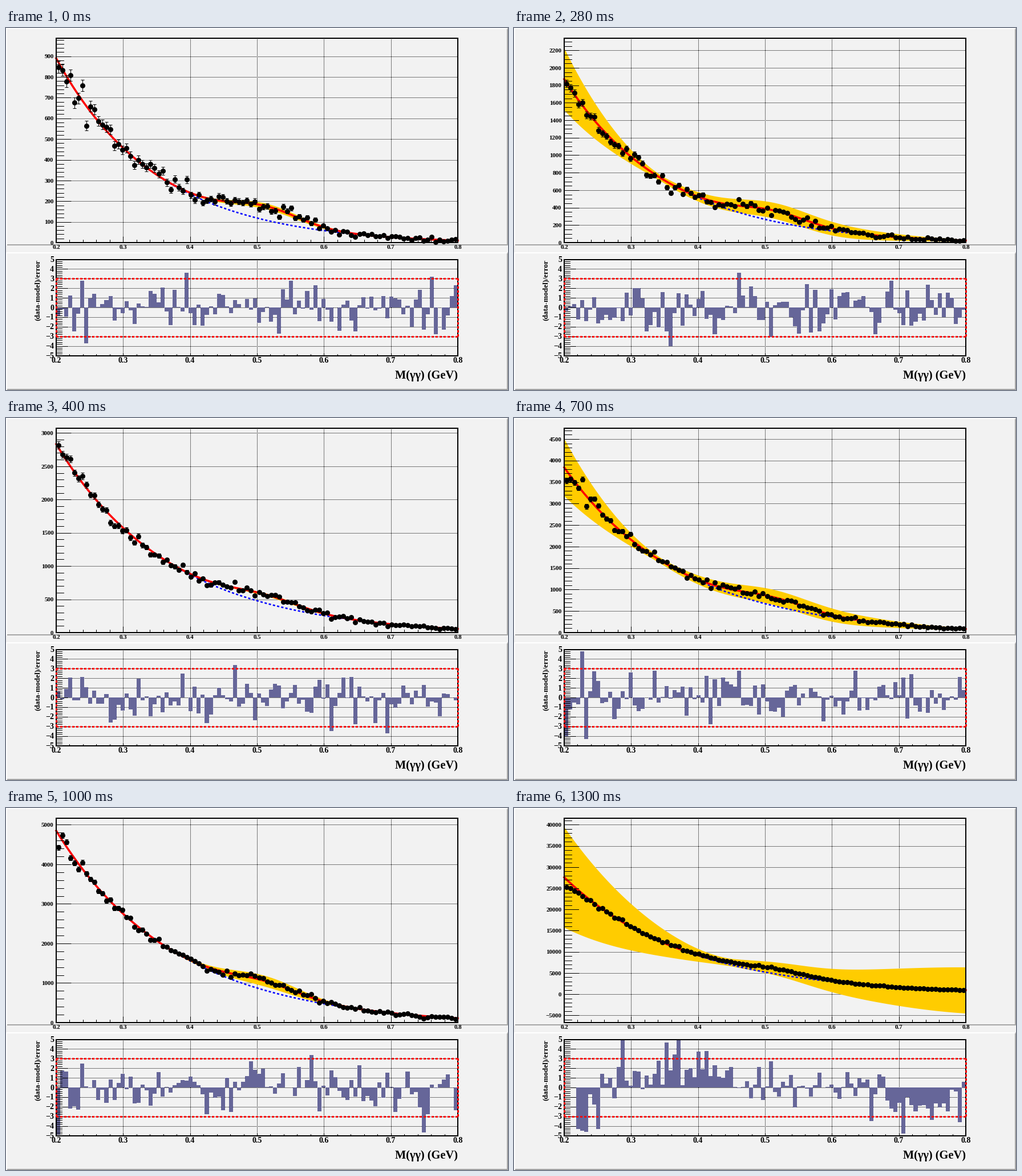
A matplotlib script for the animation above (1600 ms loop, 880 by 636 pixels).

```python
import matplotlib.pyplot as plt
import numpy as np
from matplotlib.animation import FuncAnimation

W, H, PT = 880, 636, 0.72          # stage in px, points per px
LEFT, RIGHT = 88, 792
TOP, BOTTOM = 18, 377              # spectrum box
ZERO, UNIT = 491, 16.9             # pull box: centre line, px per sigma
BINS = 100

# lo, hi, step: count axis; peak, slope, bend: background; signal: bump height
# band: edge width, pinch point, hump width, hump centre, hump spread
# spikes: the bins that stand out of the noise
FITS = [
    dict(lo=0, hi=987, step=100, peak=890, slope=4.0, bend=.5, signal=68,
         band=(2, .25, 4, .53, .1), spikes={7: -3.7, 32: 3.6, 93: 3.2}),
    dict(lo=0, hi=2338, step=200, peak=1870, slope=3.87, bend=.5, signal=124,
         band=(53, .25, 13, .55, .2), spikes={26: -4, 43: 3.6, 51: -3.1}),
    dict(lo=0, hi=3072, step=500, peak=2833, slope=3.53, bend=.4, signal=130,
         band=(1, .25, 1.5, .55, .1), spikes={44: 3.4, 68: -3.5, 82: -3.7}),
    dict(lo=0, hi=4751, step=500, peak=3840, slope=3.46, bend=.37, signal=200,
         band=(49, .25, 12.5, .55, .2), spikes={0: -4, 4: 4.8, 5: -4.3}),
    dict(lo=0, hi=5165, step=1000, peak=4849, slope=3.4, bend=.4, signal=235,
         band=(1, .25, 8.5, .52, .1), spikes={0: -4.9, 63: 3.4, 91: -4.7}),
    dict(lo=-6710, hi=41540, step=5000, peak=27600, slope=3.33, bend=.04, signal=1250,
         band=(87, .42, 40, 1.05, .32), spikes={8: -4.3, 14: 5, 84: -4.8}, drift=True),
]

plt.rcParams["font.family"] = "Liberation Serif"
plt.rcParams["font.weight"] = "bold"
fig = plt.figure(figsize=(W / 100, H / 100), dpi=100, facecolor="#f2f2f2")
ax = fig.add_axes([0, 0, 1, 1])
ax.axis("off")
ax.set_xlim(0, W)
ax.set_ylim(H, 0)


def to_x(t):
    return LEFT + t * (RIGHT - LEFT)


def bell(t, centre, spread):
    return np.exp(-0.5 * ((t - centre) / spread) ** 2)


def line(x, y, color="k", w=1, dash=None, **kw):
    if dash:
        kw["linestyle"] = (0, [d / (w * PT) for d in np.multiply(dash, PT)])
    kw.setdefault("antialiased", False)
    return ax.plot(x, y, color=color, lw=w * PT, **kw)[0]


def label(x, y, s, size, **kw):
    kw.setdefault("ha", "right")
    return ax.text(x, y, s, fontsize=size * PT, va="baseline", **kw)


def grid(x, y):
    return line(x, y, dash=(1, 2), zorder=1)


def box(top, bottom):
    line([LEFT, RIGHT, RIGHT, LEFT, LEFT], [top, top, bottom, bottom, top],
         w=2, zorder=6, solid_joinstyle="miter")


def pad(top, bottom):
    line([0, W], [bottom, bottom], "#a6a6a6", 2)
    line([W - 1, W - 1], [top, bottom], "#a6a6a6", 2)
    line([0, W - 2], [top, top], "white", 2)
    line([1, 1], [top, bottom], "white", 2)


def signed(v):
    return f"{v:d}".replace("-", "\u2212")


def x_axis(top, bottom, base, size, long, short):
    for k in range(31):
        x = to_x(k / 30)
        major = k % 5 == 0
        line([x, x], [bottom, bottom - (long if major else short)], zorder=6)
        if major:
            label(x, base, f"{0.2 + 0.02 * k:.1f}", size, ha="center", zorder=7)
            if 0 < k < 30:
                grid([x, x], [top, bottom])


def draw_static():
    pad(1, 381)
    pad(395, 635)
    low, high = ZERO + 5 * UNIT, ZERO - 5 * UNIT
    box(TOP, BOTTOM)
    box(high, low)
    x_axis(TOP, BOTTOM, 388, 11, 10, 5)
    x_axis(high, low, 587.5, 14, 5, 3)
    for k in range(-25, 26):
        y = ZERO - k * UNIT / 5
        major = k % 5 == 0
        line([LEFT, LEFT + (20 if major else 10)], [y, y], zorder=6)
        if major:
            label(84, y + 4.5, signed(k // 5), 14)
            grid([LEFT, RIGHT], [y, y])
    reach = 3 * UNIT
    for y in (ZERO - reach, ZERO + reach):
        line([LEFT, RIGHT], [y, y], "red", 3, (3, 3), zorder=8)
    for x in (LEFT, RIGHT):
        line([x, x], [ZERO - reach, ZERO + reach], "red", 3, (3, 3), zorder=8)
    label(58.5, 407, "(data-model)/error", 13.3, rotation=90, rotation_mode="anchor")
    label(791.5, 616, "M(γγ) (GeV)", 20.4)


def background(fit, t):
    return fit["peak"] * np.exp(-fit["slope"] * t - fit["bend"] * t ** 5)


def model(fit, t):
    return background(fit, t) + fit["signal"] * bell(t, 0.52, 0.087)


def half_band(fit, t):
    edge, pinch, hump, centre, spread = fit["band"]
    return 1 + edge * np.maximum(1 - t / pinch, 0) ** 1.6 + hump * bell(t, centre, spread)


def make_pulls(fit, seed, t):
    pulls = np.clip(np.random.RandomState(seed).normal(0, 1.35, BINS), -2.8, 2.8)
    if fit.get("drift"):
        pulls += 2.5 * bell(t, 0.28, 0.12) - 1.6 * bell(t, 0.87, 0.1) - 14 * np.exp(-t / 0.03)
    for i, p in fit["spikes"].items():
        pulls[i] = p
    return pulls


live = []


def draw_counts(fit, to_y):
    step = fit["step"]
    div = 4 if str(step).startswith("2") else 5
    minor = step // div
    for k in range(int(np.ceil(fit["lo"] / minor)), fit["hi"] // minor + 1):
        y = to_y(k * minor)
        major = k % div == 0
        live.append(line([LEFT, LEFT + (25 if major else 13)], [y, y], zorder=6))
        if major:
            live.append(label(83.5, y + 3.7, signed(k * minor), 11))
            live.append(grid([LEFT, RIGHT], [y, y]))


def draw_curves(fit, to_y):
    t = np.linspace(0, 1, 121)
    x, y, half = to_x(t), to_y(model(fit, t)), half_band(fit, t)
    live.append(ax.fill_between(x, y - half, y + half, color="#ffcc00", lw=0,
                                antialiased=False, zorder=2))
    live.append(line(x, to_y(background(fit, t)), "blue", 2.6, (4, 3.5),
                     zorder=3, antialiased=True))
    live.append(line(x, y, "red", 3.5, zorder=4, antialiased=True))


def draw_data(fit, to_y, seed):
    t = (np.arange(BINS) + 0.5) / BINS
    pulls = make_pulls(fit, seed, t)
    mean = model(fit, t)
    data = np.maximum(mean + pulls * np.sqrt(mean), 1)
    x, y = to_x(t), to_y(data)
    err = to_y(data - np.sqrt(data)) - y
    live.append(ax.errorbar(x, y, err, fmt="none", ecolor="k", elinewidth=PT,
                            capsize=3 * PT, capthick=PT, zorder=5))
    live.append(ax.plot(x, y, "ko", ms=9 * PT, mew=0, zorder=7)[0])

    shown = np.where(pulls < -5, 0, np.minimum(pulls, 5))
    width = (RIGHT - LEFT) / BINS
    live.append(ax.bar(LEFT + width * np.arange(BINS), -UNIT * shown, width, ZERO,
                       align="edge", color="#666699", lw=0, antialiased=False, zorder=3))


def update(n):
    while live:
        live.pop().remove()
    i = (n + 2) // 3               # the first fit stays 1 tick, the others 3
    fit = FITS[i]
    lo, hi = fit["lo"], fit["hi"]

    def to_y(v):
        return BOTTOM - (v - lo) / (hi - lo) * (BOTTOM - TOP)

    draw_counts(fit, to_y)
    draw_curves(fit, to_y)
    draw_data(fit, to_y, 40 + i)
    return []


draw_static()
anim = FuncAnimation(fig, update, frames=16, interval=100, repeat=True,
                     repeat_delay=0, init_func=lambda: update(0), blit=False)
plt.show()
```
